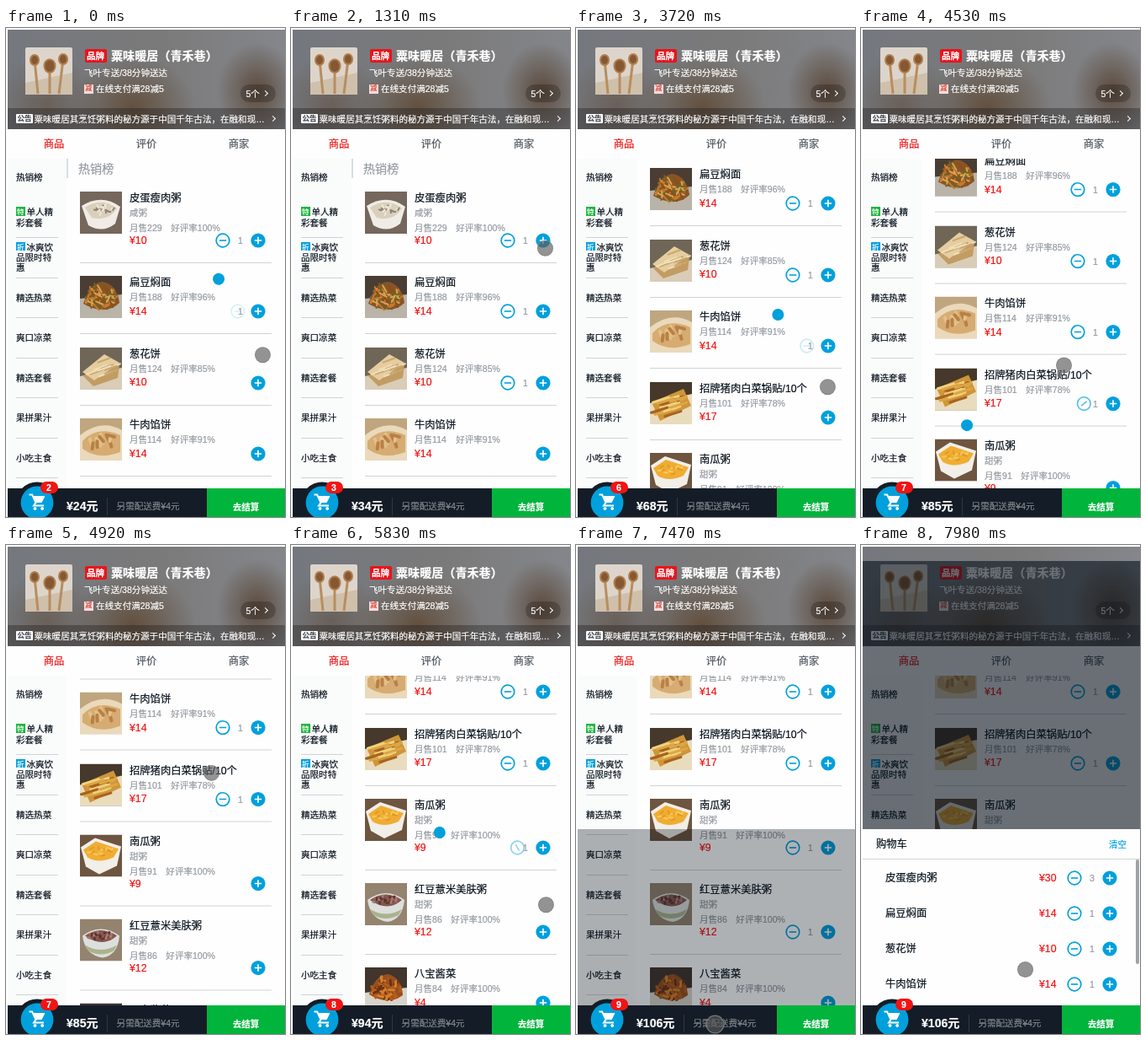
Animation, 332 px wide and 580 px high, one loop 8 s. Source, as an HTML page:

```html
<!DOCTYPE html>
<html lang="zh-CN">
<head>
<meta charset="utf-8">
<title>点餐</title>
<style>
html, body { margin: 0; width: 100%; height: 100%; overflow: hidden; background: #fff; }
#stage { position: relative; width: 332px; height: 580px; overflow: hidden; background: #fefefe;
  font: 10.56px/20px "Liberation Sans", "Noto Sans CJK SC", "Noto Sans CJK", sans-serif; color: #07111b;
  -webkit-text-stroke: .2px; }
#stage div, #stage svg { position: absolute; }
.t { white-space: nowrap; margin-top: -10px; }
.mid { transform: translateX(-50%); }
.w { color: #fff; }
.grey { color: #93999f; }
.slate { color: #4d555d; }
.red { color: #f01414; }
.blue { color: #00a0dc; }
.big { font-size: 12.32px; }
.title { font-size: 14.08px; }
.bold { font-weight: 700; }
.tag { display: flex; align-items: center; justify-content: center; white-space: nowrap; }
.arrow { width: 4px; height: 4px; border: solid #fff; border-width: 1px 1px 0 0; transform: rotate(45deg); }
.line { height: 1px; background: #d0d3d5; }
.header { left: 2px; top: 2px; width: 330px; height: 118px;
  background: radial-gradient(75px 62px at 45% 78%, #62503f, #62503f00),
    radial-gradient(48px 58px at 90% 62%, #5c4a3c, #5c4a3c00),
    radial-gradient(60px 60px at 14% 75%, #6a6059, #6a605900),
    linear-gradient(90deg, #74787e, #7b7a7a 55%, #84868b); }
.notice { left: 2px; top: 95px; width: 330px; height: 25px; background: rgba(20, 16, 16, .32); }
.view { left: 72px; top: 155px; width: 260px; height: 392px; overflow: hidden; }
#list { left: -72px; top: -155px; width: 332px; }
.menu { left: 12px; width: 50px; height: 47.5px; display: flex; align-items: center; line-height: 12.3px; }
.menu i { display: inline-block; width: 10.5px; height: 10.5px; margin-right: 2px; color: #fff;
  font: 8.5px/10.5px "Noto Sans CJK SC", sans-serif; text-align: center; vertical-align: 1px; }
.btn { width: 18px; height: 18px; margin: -9px; }
#mask { left: 2px; width: 330px; background: #07111b; bottom: 33px; }
.clip { left: 2px; top: 300px; width: 330px; height: 247px; overflow: hidden; }
#panel { left: -2px; top: -300px; width: 332px; height: 580px; }
.bar { left: 2px; top: 546px; width: 330px; height: 34px; background: #141d27; }
#sum { left: 70px; top: 11px; display: flex; white-space: nowrap; color: #fff; line-height: 21px; }
#sum b { font-size: 14.08px; padding-right: 10.5px; border-right: 1px solid rgba(255, 255, 255, .12); margin-right: 10.5px; }
#sum span { color: rgba(255, 255, 255, .42); }
.pay { left: 237px; top: 0; width: 93px; height: 43px; background: #00b43c; }
#badge { left: 40.5px; top: 538px; width: 21px; height: 14px; border-radius: 7px; background: #f01414; font-size: 10.5px; }
#ball { width: 14px; height: 14px; margin: -7px; border-radius: 50%; background: #00a0dc; }
#cursor { box-sizing: border-box; width: 19px; height: 19px; margin: -9.5px; border-radius: 50%;
  background: rgba(90, 90, 90, .65); border: 1px solid rgba(130, 130, 130, .8); }
</style>
</head>
<body>
<div id="stage"></div>
<script>
const stage = document.getElementById('stage');
const $ = id => document.getElementById(id);
const box = (cls, style = '', html = '') => `<div class="${cls}" style="${style}">${html}</div>`;
const text = (x, y, cls, s) => box('t ' + cls, `left:${x}px;top:${y}px`, s);
const line = (x, y, w) => box('line', `left:${x}px;top:${y}px;width:${w}px`);
const svg = (x, y, w, h, body) =>
  `<svg style="left:${x}px;top:${y}px" width="${w}" height="${h}" viewBox="0 0 ${w} ${h}">${body}</svg>`;

const plusIcon = '<circle cx="9" cy="9" r="8.6" fill="#00a0dc"/><path d="M4.8 9h8.4M9 4.8v8.4" stroke="#fff" stroke-width="1.6"/>';
const minusIcon = '<circle cx="9" cy="9" r="7.8" fill="none" stroke="#00a0dc" stroke-width="1.7"/><path d="M4.8 9h8.4" stroke="#00a0dc" stroke-width="1.6"/>';
const button = (x, y, icon, cls = '') =>
  `<svg class="btn ${cls}" style="left:${x}px;top:${y}px" viewBox="0 0 18 18">${icon}</svg>`;

// Dish pictures: a backdrop, a few [colour, outline] shapes and scattered garnish strokes
function photo(x, y, { back, shapes, garnish, count, length, thick, tilt, cy = 24, ry = 10 }) {
  let seed = count * 37 + length;
  const rand = () => (seed = (seed * 16807 + 11) % 2147483647) / 2147483647;
  let s = `<rect width="50" height="50" fill="${back}"/>` +
    shapes.map(([fill, d]) => `<path d="${d}" fill="${fill}"/>`).join('');
  for (let i = 0; i < count; i++) {
    const r = Math.sqrt(rand()), turn = rand() * 6.28, angle = tilt ?? rand() * 3.14;
    const px = 25 + r * 17 * Math.cos(turn), py = cy + r * ry * Math.sin(turn);
    const dx = Math.cos(angle) * length / 2, dy = Math.sin(angle) * length / 2;
    s += `<path d="M${(px - dx).toFixed(1)} ${(py - dy).toFixed(1)}L${(px + dx).toFixed(1)} ${(py + dy).toFixed(1)}"
      stroke="${garnish[i % garnish.length]}" stroke-width="${thick}" stroke-linecap="round"/>`;
  }
  return svg(x, y, 50, 50, s);
}

const foods = [
  ['皮蛋瘦肉粥', '咸粥', 229, 100, 10, { back: '#75675c', garnish: ['#8d8474', '#efe8d8'], count: 16, length: 3, thick: 2,
    shapes: [['#f0ece5', 'M2 17Q26 2 48 18L42 38Q27 50 10 40z'], ['#d9cfbb', 'M6 19Q26 6 44 20Q34 36 14 31z']], cy: 21, ry: 7 }],
  ['扁豆焖面', '', 188, 96, 14, { back: '#4a3d33', garnish: ['#c47a30', '#8a4f1e', '#6a6426', '#dba250'], count: 60, length: 9, thick: 2,
    shapes: [['#b9b3a8', 'M0 27L50 22V50H0z'], ['#8b5425', 'M4 33Q12 8 27 7Q44 10 47 32Q30 48 4 33z']], cy: 25, ry: 13 }],
  ['葱花饼', '', 124, 85, 10, { back: '#6f6657', garnish: ['#f0dfbb', '#c9a76f'], count: 10, length: 15, thick: 2, tilt: -.35,
    shapes: [['#d9cdb8', 'M0 34L50 24V50H0z'], ['#c29c63', 'M4 34L30 10L47 20L45 36L16 46z'], ['#e5cd9f', 'M3 29L29 8L47 18L17 39z']] }],
  ['牛肉馅饼', '', 114, 91, 14, { back: '#c0a67f', garnish: ['#e3c08a', '#b98046'], count: 12, length: 7, thick: 4,
    shapes: [['#ead9bb', 'M0 20Q25 0 50 14V50H0z'], ['#d6ac72', 'M3 27Q20 8 48 20V40Q22 50 3 36z']], cy: 27, ry: 9 }],
  ['招牌猪肉白菜锅贴/10个', '', 101, 78, 17, { back: '#46382a', garnish: ['#f0d27c', '#a8641f', '#dca646'], count: 18, length: 20, thick: 3, tilt: -.3,
    shapes: [['#e9dcbd', 'M0 25L50 14V50H0z'], ['#cf9539', 'M2 24L40 8L49 28L12 46z']], cy: 27, ry: 11 }],
  ['南瓜粥', '甜粥', 91, 100, 9, { back: '#6e5540', garnish: ['#f8c95c', '#e29a22'], count: 14, length: 4, thick: 2,
    shapes: [['#f2eee8', 'M1 15L18 4L49 14L44 37L23 47L7 38z'], ['#f0ad33', 'M4 18L19 8L46 17L40 27Q22 35 9 27z']], cy: 19, ry: 6 }],
  ['红豆薏米美肤粥', '甜粥', 86, 100, 12, { back: '#94836f', garnish: ['#5e3431', '#a67c72', '#8d5a50'], count: 34, length: 2, thick: 2.5,
    shapes: [['#dcdfdc', 'M3 20Q25 4 47 20Q45 43 27 46Q6 43 3 20z'], ['#a9b38d', 'M6 31Q25 42 44 31L40 38Q25 46 10 38z'],
      ['#80564d', 'M6 20Q25 7 44 20Q27 35 6 20z']], cy: 20, ry: 5 }],
  ['八宝酱菜', '', 84, 100, 4, { back: '#41352d', garnish: ['#d4802c', '#6b3216', '#b85a1c'], count: 40, length: 6, thick: 3,
    shapes: [['#d8d3cb', 'M0 30L50 24V50H0z'], ['#96501e', 'M5 32Q12 9 28 8Q44 13 45 33Q27 46 5 32z']], cy: 25, ry: 12 }]
];
const tops = [];
foods.reduce((y, f) => (tops.push(y), y + (f[1] ? 100 : 84.5)), 194);
const controlY = i => tops[i] + (foods[i][1] ? 58 : 42);

const foodHtml = foods.map(([name, desc, sold, rate, price, look], i) => {
  const y = tops[i], extra = desc ? 43 : 25, c = controlY(i);
  return photo(88, y, look) + text(147, y + 8, 'big', name) + (desc ? text(147, y + 25, 'grey', desc) : '') +
    text(147, y + extra, 'grey', `月售${sold}`) +
    text(147 + 31.6 + String(sold).length * 5.87, y + extra, 'grey', `好评率${rate}%`) +
    text(147, c - .5, 'big red', '¥' + price) +
    button(258, c, minusIcon, 'minus') + text(279, c, 'grey mid count', '') + button(300, c, plusIcon) +
    line(88, y + (desc ? 84 : 68), 228);
}).join('');

const menus = ['热销榜', '<i style="background:#1fb53f">特</i>单人精彩套餐', '<i style="background:#00a0dc">折</i>冰爽饮品限时特惠',
  '精选热菜', '爽口凉菜', '精选套餐', '果拼果汁', '小吃主食'];
const menuHtml = menus.map((m, i) =>
  box('menu', `top:${153.5 + i * 47.5}px`, `<span>${m}</span>`) + (i ? line(12, 200.5 + i * 47.5, 50) : '')).join('');

const spoons = [[11, 15, 15, 5], [29, 22, 29, 6.5], [45, 14, 40, 5]].map(([x, y, foot, r]) =>
  `<path d="M${x} ${y}L${foot} 55" stroke="#b98d5f" stroke-width="3"/>
   <ellipse cx="${x}" cy="${y}" rx="${r}" ry="${r * 1.2}" fill="#855833" stroke="#b07d4c" stroke-width="2"/>`).join('');

const headerHtml = box('header') + box('notice') +
  svg(23, 23, 56, 56, `<rect width="56" height="56" rx="2" fill="#ddd5cb"/><path d="M0 42L56 30V56H0z" fill="#cfc0ac"/>${spoons}`) +
  box('tag w bold', 'left:93.5px;top:25px;width:26px;height:16px;background:#e8141c;border-radius:2px', '品牌') +
  text(125, 33, 'title w bold', '粟味暖居（青禾巷）') + text(93, 53, 'w', '飞叶专送/38分钟送达') +
  box('tag', 'left:93px;top:67px;width:10.5px;height:10.5px;background:#f6dcd9;color:#d8423c;font-size:8px', '减') +
  text(107, 72, 'w', '在线支付满28减5') +
  box('', 'left:279px;top:67px;width:42px;height:21px;border-radius:12px;background:rgba(0,0,0,.22)') +
  text(285.5, 77.5, 'w', '5个') + box('arrow', 'left:306px;top:75px') +
  box('tag bold', 'left:12px;top:102px;width:20px;height:10.5px;background:#fff;border-radius:1px;font-size:8.5px;color:#444a52', '公告') +
  text(33.5, 107.5, 'w', '粟味暖居其烹饪粥料的秘方源于中国千年古法，在融和现…') + box('arrow', 'left:315px;top:105px');

const tabHtml = ['商品', '评价', '商家'].map((s, i) =>
  text(57 + i * 110, 138, 'big mid ' + (i ? 'slate' : 'red'), s)).join('');

const panelHtml = box('', 'left:2px;top:337px;width:330px;height:243px;background:#fefefe') + line(2, 372, 330) +
  text(18, 355, 'big', '购物车') + text(295, 355, 'blue', '清空') +
  [3, 1, 1, 1].map((n, i) => {
    const y = 394.5 + i * 42.2;
    return text(29, y, 'big', foods[i][0]) + text(212, y, 'big red', '¥' + n * foods[i][4]) +
      button(254, y, minusIcon) + text(275, y, 'grey mid', n) + button(296, y, plusIcon);
  }).join('') + box('', 'left:327px;top:373px;width:4px;height:124px;border-radius:2px;background:#9fa3a6');

const cartHtml = `<circle cx="25" cy="25" r="24.6" fill="#141d27"/><circle cx="25" cy="25" r="19.4" fill="#00a0dc"/>
  <g transform="translate(25 24)" stroke="#fff" fill="none"><path d="M-9.5-8.5h3.6L-1.5 1-4 4.5H8" stroke-width="2"/>
  <path d="M-4.8-6.5H8.8L5.3.6H-1.5z" fill="#fff"/><circle cx="-2.5" cy="8" r="1.5" fill="#fff"/><circle cx="6.2" cy="8" r="1.5" fill="#fff"/></g>`;

stage.innerHTML =
  box('', 'left:2px;top:155px;width:70px;height:392px;background:#fafbfb') + menuHtml +
  box('view', '', `<div id="list">${box('', 'left:72px;top:155px;width:2px;height:23px;background:#d9dde1')}
    ${text(86, 166.5, 'title grey', '热销榜')}${foodHtml}</div>`) +
  headerHtml + tabHtml + '<div id="mask"></div>' +
  box('clip', '', `<div id="panel">${panelHtml}</div>`) +
  box('bar', '', `<div id="sum"><b id="price"></b><span>另需配送费¥4元</span></div>${box('pay tag w bold', '', '去结算')}`) +
  svg(12, 538, 50, 50, cartHtml) + '<div id="badge" class="tag w bold"></div><div id="ball"></div><div id="cursor"></div>';

const minuses = stage.querySelectorAll('.minus'), counts = stage.querySelectorAll('.count');

// Taps on the plus buttons: [time, dish]
const taps = [[-900, 0], [-60, 1], [760, 2], [1400, 0], [1820, 0], [3640, 3], [4270, 4], [5650, 5], [6250, 6]];
const scrollPath = [[2350, 0], [2540, 66], [2700, 108], [2780, 118], [3000, 125], [3300, 128], [4480, 128],
  [4530, 144], [4700, 220], [4900, 285], [5100, 318], [5350, 331]];
const cursorPath = [[0, 305, 387], [200, 303, 420], [860, 303, 420], [1330, 302, 254], [1900, 302, 254], [2300, 210, 378],
  [2350, 208, 378], [2540, 207, 312], [2720, 208, 258], [2900, 222, 262], [3150, 321, 325], [3420, 302, 378],
  [3640, 301, 378], [3720, 299, 425], [3900, 301, 462], [4290, 301, 462], [4450, 243, 416], [4530, 241, 400],
  [4800, 238, 285], [5000, 248, 260], [5400, 302, 360], [5670, 302, 360], [5830, 303, 426], [5980, 302, 460],
  [6330, 302, 460], [6900, 165, 568], [7560, 165, 568], [7940, 195, 503]];

const clamp = v => Math.min(1, Math.max(0, v));
const smooth = v => (v = clamp(v), v * v * (3 - 2 * v));
function along(path, t) {
  const next = path.findIndex(p => p[0] > t);
  if (next === 0) return path[0].slice(1);
  if (next < 0) return path.at(-1).slice(1);
  const a = path[next - 1], b = path[next], k = (t - a[0]) / (b[0] - a[0]);
  return a.slice(1).map((v, i) => v + (b[i + 1] - v) * k);
}
function bezier(x, x1, y1, x2, y2) {
  const at = (s, p, q) => 3 * p * s * (1 - s) ** 2 + 3 * q * s * s * (1 - s) + s ** 3;
  let lo = 0, hi = 1;
  for (let i = 0; i < 24; i++) {
    const s = (lo + hi) / 2;
    if (at(s, x1, x2) < x) lo = s; else hi = s;
  }
  return at(lo, y1, y2);
}
const move = (el, x, y, more = '') => { el.style.transform = `translate(${x}px,${y}px) ${more}`; };

function render(t) {
  const scroll = along(scrollPath, t)[0];
  move($('list'), 0, -scroll);

  const done = taps.filter(([at]) => at <= t);
  foods.forEach((_, i) => {
    const mine = done.filter(tap => tap[1] === i);
    const p = mine.length ? clamp((t - mine[0][0]) / 400) : 0;
    counts[i].textContent = mine.length || '';
    minuses[i].style.opacity = p;
    move(minuses[i], 21 * (1 - p), 0, `rotate(${-180 * (1 - smooth((p - .2) / .65))}deg)`);
  });
  $('price').textContent = `¥${done.reduce((sum, tap) => sum + foods[tap[1]][4], 0)}元`;
  $('badge').textContent = done.length;

  const [at, dish] = done.at(-1), p = (t - at) / 400;
  $('ball').style.display = p < 1 ? '' : 'none';
  if (p < 1) {
    const startY = controlY(dish) - along(scrollPath, at)[0] - 23;
    move($('ball'), 291.8 - 254 * p, startY + (563 - startY) * bezier(p, .49, -.29, .75, .41));
  }

  const opened = t >= 7560;
  $('mask').style.top = opened ? '19px' : '337px';
  $('mask').style.opacity = .6 * clamp((t - 7200) / 500);
  move($('panel'), 0, 212 * (1 - smooth((t - 7560) / 340)));

  const [x, y] = along(cursorPath, t);
  move($('cursor'), x, y, t > 7200 && t < 7560 ? 'scale(1.16)' : '');
}

const start = performance.now();
(function frame() {
  render((performance.now() - start) % 8000);
  requestAnimationFrame(frame);
})();
</script>
</body>
</html>
```
